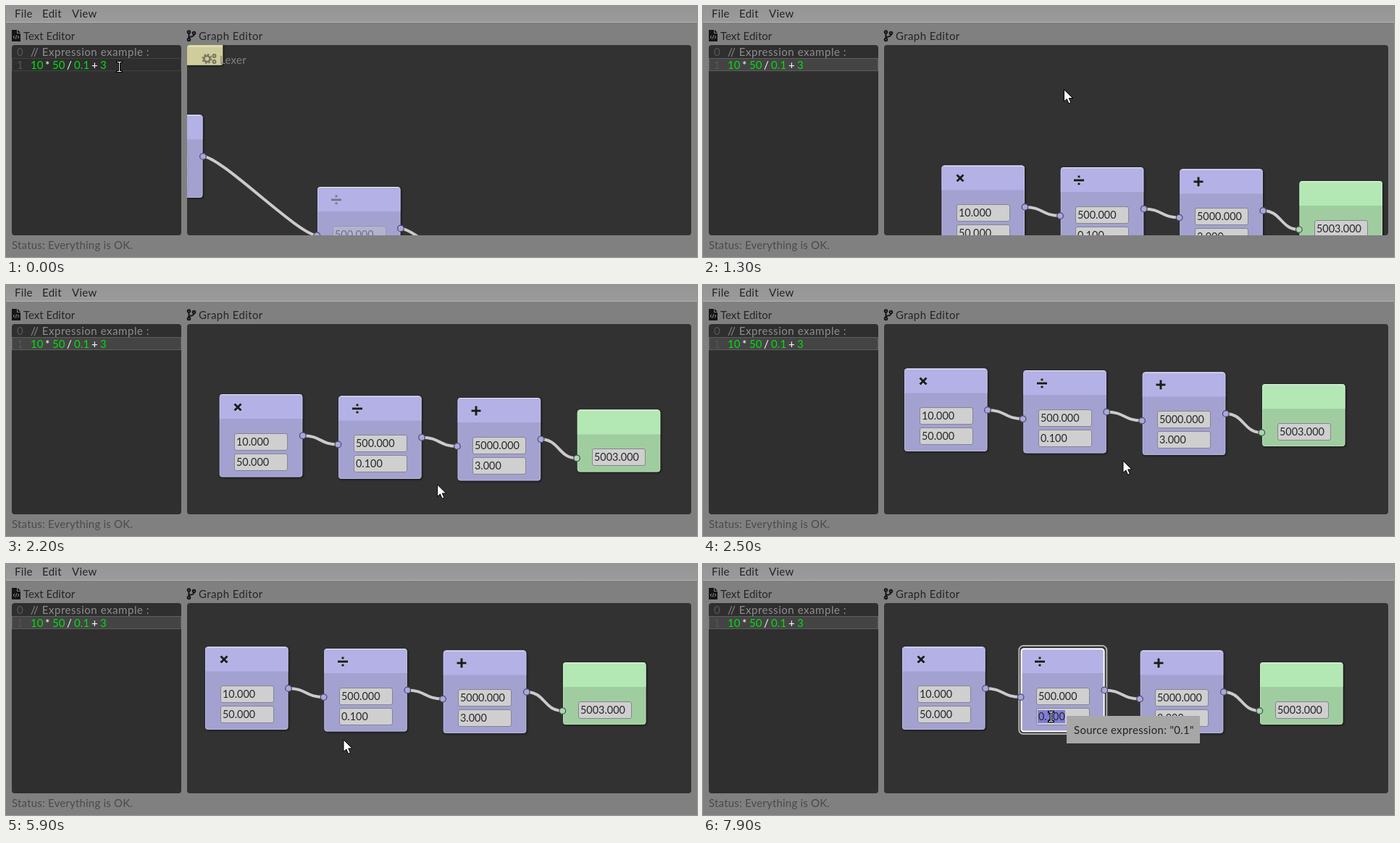
Animation of 954x347 px, one loop 8000 ms. Source, as an HTML page:

```html
<!DOCTYPE html>
<html lang="en">
<head>
<meta charset="utf-8">
<title>Node editor</title>
<style>
html, body { margin: 0; width: 100%; height: 100%; overflow: hidden; background: #808080; }
svg { display: block; width: 954px; height: 347px; }
text { font: 15px Lato, "Open Sans", sans-serif; letter-spacing: .3px; fill: #242424; white-space: pre; }
.value { font-size: 14.4px; letter-spacing: 0; fill: #282828; }
.code { letter-spacing: .1px; fill: #00e010; }
.code .op { fill: #fff; }
.note { letter-spacing: .55px; fill: #8e8e8e; }
.number { fill: #565656; }
.status { letter-spacing: .2px; fill: #4a4a4a; }
.icon { fill: none; stroke: #1c1c1c; stroke-width: 3; filter: drop-shadow(.7px 1px 0 #ffffff80); }
.link { fill: none; stroke: #cbcbcb; stroke-width: 4; }
.node { filter: drop-shadow(1px 1px 1.5px #000a); }
</style>
</head>
<body>
<svg viewBox="0 0 954 347">
  <defs>
    <clipPath id="view"><rect x="250" y="54" width="696" height="263" rx="4"/></clipPath>
    <linearGradient id="bar" x2="0" y2="1"><stop stop-color="#959595"/><stop offset="1" stop-color="#9b9b9b"/></linearGradient>
  </defs>
  <rect width="954" height="347" fill="#808080"/>
  <rect width="954" height="22" fill="url(#bar)"/>
  <rect y="22" width="954" height="1" fill="#b2b2b2"/>
  <text x="12" y="16">File</text><text x="50" y="16">Edit</text><text x="91" y="16">View</text>

  <path d="M8 33h7v5h5v11H8zM16 33l4 4h-4z" fill="#151515"/>
  <path d="M12 41l-2 2 2 2M16 41l2 2-2 2M14.6 40.5l-1.2 5" fill="none" stroke="#909090"/>
  <text x="24" y="47" style="letter-spacing:0">Text Editor</text>
  <g fill="none" stroke="#151515" stroke-width="2">
    <circle cx="252.5" cy="36" r="1.8"/><circle cx="259.5" cy="37.5" r="1.8"/><circle cx="252.5" cy="46.5" r="1.8"/>
    <path d="M252.5 38v7M259.5 39.5q0 3-7 3.5"/>
  </g>
  <text x="266" y="47" style="letter-spacing:.4px">Graph Editor</text>

  <rect x="8" y="54" width="234" height="263" rx="4" fill="#2f2f2f"/>
  <rect id="line" x="8.5" y="72.5" width="233" height="17"/>
  <text x="15" y="69" class="number">0</text><text x="15" y="87" class="number">1</text>
  <text x="34" y="69" class="note">// Expression example :</text>
  <text y="87" class="code"><tspan x="34">10</tspan><tspan x="54" class="op">*</tspan><tspan x="64">50</tspan><tspan x="84" class="op">/</tspan><tspan x="94">0.1</tspan><tspan x="118" class="op">+</tspan><tspan x="130">3</tspan></text>
  <text x="8" y="336" class="status">Status: Everything is OK.</text>

  <rect x="250" y="54" width="696" height="263" rx="4" fill="#323232"/>
  <g clip-path="url(#view)">
    <g id="lexer">
      <rect class="node" x="200" y="20" width="99" height="61.5" rx="3" fill="#cfcd9b" stroke="#e6e4b8" stroke-opacity=".6"/>
      <rect x="250" y="54" width="49" height="3" fill="#dfdda8"/>
      <g fill="none" stroke="#77755f">
        <circle cx="277.5" cy="73" r="4" stroke-width="2.5"/>
        <circle cx="277.5" cy="73" r="6" stroke-width="2" stroke-dasharray="2.4 2.3"/>
        <circle cx="287.5" cy="69" r="2" stroke-width="2"/><circle cx="287.5" cy="77" r="2" stroke-width="2"/>
      </g>
      <text x="295" y="80" style="fill:#808080">Lexer</text>
    </g>
    <g id="nodes"></g>
    <g id="links"></g>
  </g>
  <g id="tip">
    <rect height="38" fill="#a7a7a7"/>
    <text x="10" y="25"></text>
  </g>
  <path id="arrow" d="M0 0V16.5L3.8 13L6.6 19.3L9.4 18L6.7 12H12z" fill="#fff" stroke="#000" stroke-linejoin="round"/>
  <g id="beam" fill="none">
    <path d="M-2.5 -6.5H3.5M-2.5 6.5H3.5M.5 -6.5V6.5" stroke="#000" stroke-width="3" stroke-linecap="square"/>
    <path d="M-2.5 -6.5H3.5M-2.5 6.5H3.5M.5 -6.5V6.5" stroke="#fff"/>
  </g>
</svg>
<script>
const $ = id => document.getElementById(id);
const LOOP = 8000, STEP = 100;

const violet = { head: '#b3b1e5', body: '#a3a1d0', edge: '#d9d8f6', pin: '#a9a7e0' };
const green = { head: '#b3e8b4', body: '#a0cd9f', edge: '#d8f6d8', pin: '#a4dca6' };
const cross = 'M-4.5 -4.5L4.5 4.5M-4.5 4.5L4.5 -4.5';
const divide = 'M-7 0H7M-1.5 -5H1.5M-1.5 5H1.5';
const plus = 'M-6.5 0H6.5M0 -6.5V6.5';

// dx, dy: place in the settled layout, relative to the first node
const nodes = [
  { dx: 0, dy: 0, h: 114.5, look: violet, icon: cross, values: ['10.000', '50.000'] },
  { dx: 164.3, dy: 2.5, h: 114.5, look: violet, icon: divide, values: ['500.000', '0.100'] },
  { dx: 328.8, dy: 5, h: 114.5, look: violet, icon: plus, values: ['5000.000', '3.000'] },
  { dx: 494, dy: 21.5, h: 86, look: green, icon: '', values: ['5003.000'] }
];

const pan = [
  [1100, 353, 266.6], [1500, 306, 174.6], [2000, 306, 174.6], [2500, 278, 115.6],
  [3199, 278, 115.6], [3200, 275, 114.6]
];
const glide = [
  [100, 156, 84], [1000, 489, 130], [1100, 521, 161], [1500, 476, 70],
  [1900, 608, 300], [2000, 606, 298], [2500, 580, 243]
];
// time, x, y, then the hovered expression and its tooltip's y
const jumps = [
  [3200, 589, 267], [3400, 614, 198], [3700, 466, 140], [3900, 472, 139], [4100, 479, 145],
  [4400, 484, 188, '10*50', 181], [5000, 496, 210, '0.1', 203], [5300, 496, 211, '0.1', 211],
  [5900, 466, 243], [6300, 379, 217], [6800, 483, 210, '0.1', 212], [7200, 501, 211, '0.1', 212],
  [7500, 517, 211, '0.1', 212], [7900, 480, 211, '0.1', 210]
];
const outline = [[7200, .7], [7500, .8], [7700, .9], [7900, 1]];

const field = (text, i) => {
  const y = 54 + 28 * i;
  const mark = text === '0.100' ? `<rect id="mark" x="23" y="${y + 3}" width="38" height="18" fill="#7f7dd6"/>` : '';
  return `<rect x="21.5" y="${y + .5}" width="73" height="23" rx="2.5" fill="#cfcfcf" stroke="#85858f"/>
    ${mark}<text class="value" x="24" y="${y + 17}">${text}</text>`;
};

const nodeMarkup = ({ h, look, icon, values }, i) => `<g>
  ${i === 1 ? '<rect id="ring" x="-3" y="-4" width="121" height="122" rx="6" fill="none" stroke="#b4b4b4" stroke-width="2"/>' : ''}
  <g class="node">
    <rect width="114.5" height="${h}" rx="4" fill="${look.body}"/>
    <path d="M0 34V4Q0 0 4 0H110.5Q114.5 0 114.5 4V34z" fill="${look.head}"/>
  </g>
  <rect x=".5" y=".5" width="113.5" height="${h - 1}" rx="3.5" fill="none" stroke="${look.edge}" stroke-opacity=".45"/>
  <path d="M3 .5H111.5" stroke="#fff" stroke-opacity=".7"/>
  ${i === 1 ? '<rect id="rim" x=".2" y=".2" width="114.2" height="114.2" rx="3.5" fill="none" stroke="#fff" stroke-width="2"/>' : ''}
  <g class="content"><path class="icon" d="${icon}" transform="translate(26 18)"/>${values.map(field).join('')}</g>
</g>`;

const pin = look => `<circle r="4.3" fill="${look.pin}" stroke="#4a4a5c" stroke-width="1.2"/>`;

$('nodes').innerHTML = nodes.map(nodeMarkup).join('');
$('links').innerHTML = nodes.slice(1).map((n, i) =>
  `<g><path class="link"/>${pin(nodes[i].look)}${pin(n.look)}</g>`).join('');

const nodeEls = [...$('nodes').children];
const linkEls = [...$('links').children];
const contents = document.querySelectorAll('.content');
const [tipBox, tipText] = $('tip').children;

const mix = (a, b, p) => a + (b - a) * p;
const move = (el, x, y) => el.setAttribute('transform', `translate(${x} ${y})`);
const show = (el, on) => { el.style.display = on ? '' : 'none'; };
const held = (keys, t) => keys.filter(k => k[0] <= t).pop();

function along(keys, t) {
  const next = keys.findIndex(k => k[0] > t);
  if (next === 0) return keys[0].slice(1);
  if (next < 0) return keys[keys.length - 1].slice(1);
  const a = keys[next - 1], b = keys[next];
  const p = (t - a[0]) / (b[0] - a[0]);
  return [mix(a[1], b[1], p), mix(a[2], b[2], p)];
}

function drawGraph(t) {
  const p = t >= 1000 ? 1 : 1 - Math.pow(.6, Math.max(0, t / STEP - 1));
  const [px, py] = along(pan, t);
  const at = nodes.map((n, i) => [
    mix(157 + 273 * i, px + n.dx, p),
    mix(150.6 + 99.5 * i, py + n.dy, p)
  ]);
  at.forEach(([x, y], i) => {
    move(nodeEls[i], x, y);
    // Icons and fields sit on whole pixels
    move(contents[i], Math.floor(x) - x, Math.floor(y) - y);
    contents[i].style.opacity = mix(.4, 1, p);
  });
  linkEls.forEach((el, i) => {
    const x1 = at[i][0] + 115, y1 = at[i][1] + 57.3;
    const x2 = at[i + 1][0] - .7, y2 = at[i + 1][1] + 67;
    const bend = 25;
    const [path, from, to] = el.children;
    path.setAttribute('d', `M${x1} ${y1}C${x1 + bend} ${y1} ${x2 - bend} ${y2} ${x2} ${y2}`);
    move(from, x1, y1);
    move(to, x2, y2);
  });
  $('lexer').style.opacity = Math.max(0, 1 - Math.max(0, t - 100) / 400);

  const ring = held(outline, t);
  for (const id of ['ring', 'rim', 'mark']) show($(id), ring);
  $('ring').style.opacity = $('rim').style.opacity = ring ? ring[1] : 0;
}

function drawPointer(t) {
  const [, x, y, source, tipY] = held(jumps, t) || [0, ...along(glide, t)];
  const typing = x < 242 || source;
  show($('beam'), typing);
  show($('arrow'), !typing);
  move(typing ? $('beam') : $('arrow'), x, y);
  show($('tip'), source);
  if (source) {
    move($('tip'), x + 22, tipY);
    tipBox.setAttribute('width', source === '0.1' ? 184 : 202);
    tipText.textContent = `Source expression: "${source}"`;
  }
}

function frame() {
  const t = Math.floor(performance.now() % LOOP / STEP) * STEP;
  const focus = t >= 200;
  $('line').setAttribute('fill', focus ? '#444' : '#2e2e2e');
  $('line').setAttribute('stroke', focus ? '#5e5e5e' : '#424242');
  drawGraph(t);
  drawPointer(t);
  requestAnimationFrame(frame);
}
frame();
</script>
</body>
</html>
```
